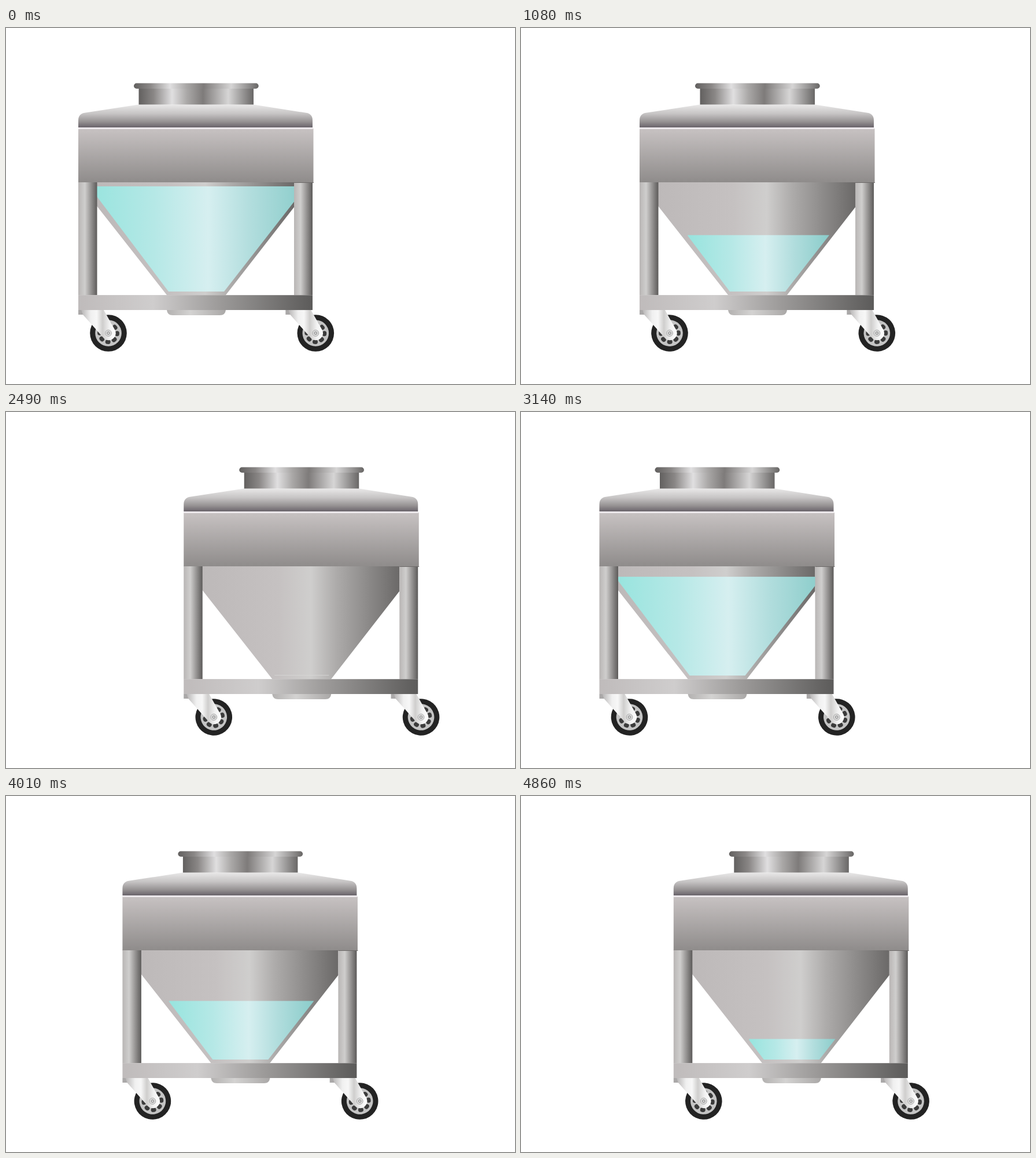
An HTML page for the animation above (4.91 s loop, 880 by 616 pixels).

```html
<!DOCTYPE html>
<html lang="en">
<head>
<meta charset="utf-8">
<title>Rolling hopper</title>
<style>
  /* --x: distance rolled in px; level and wheel angle follow from it */
  @property --x { syntax: '<number>'; inherits: true; initial-value: 0; }

  html, body { margin: 0; width: 100%; height: 100%; overflow: hidden; background: #fff; }
  svg { display: block; width: 880px; height: 616px; animation: roll 4910ms infinite; }

  .bin { transform: translateX(calc(var(--x) * 1px)); }
  .liquid {
    transform-box: view-box;
    transform-origin: 330.5px 0;
    transform: translateY(calc(var(--x) * 1.055px)) scaleX(calc(1 - var(--x) * .00432));
  }
  .wheel { transform: rotate(calc(var(--x) * 1.64deg)); }

  @keyframes roll {
    0%      { --x: 0;     animation-timing-function: steps(1); }
    .6%     { --x: 3.5;   animation-timing-function: steps(10); }
    10.58%  { --x: 38.5;  animation-timing-function: steps(12); }
    21.97%  { --x: 80;    animation-timing-function: steps(13); }
    34.6%   { --x: 125;   animation-timing-function: steps(12); }
    45.58%  { --x: 166;   animation-timing-function: steps(8); }
    53.259% { --x: 192;   animation-timing-function: steps(1); }
    53.26%  { --x: -28.2; animation-timing-function: steps(16); }
    68.6%   { --x: 28.1;  animation-timing-function: steps(14); }
    81.63%  { --x: 76.4;  animation-timing-function: steps(18); }
    98.94%, 100% { --x: 138.8; animation-timing-function: steps(1); }
  }
</style>
</head>
<body>
<svg viewBox="0 0 880 616" xmlns="http://www.w3.org/2000/svg">
  <defs>
    <linearGradient id="neck">
      <stop offset="0" stop-color="#62605f"/>
      <stop offset=".13" stop-color="#8a8786"/>
      <stop offset=".29" stop-color="#e0dfe0"/>
      <stop offset=".42" stop-color="#aaa8a7"/>
      <stop offset=".56" stop-color="#7e7b7a"/>
      <stop offset=".78" stop-color="#d6d5d5"/>
      <stop offset="1" stop-color="#696766"/>
    </linearGradient>
    <linearGradient id="dome" x2="0" y2="1">
      <stop offset="0" stop-color="#e9e8e8"/>
      <stop offset=".4" stop-color="#c6c4c4"/>
      <stop offset=".75" stop-color="#969293"/>
      <stop offset="1" stop-color="#69636a"/>
    </linearGradient>
    <linearGradient id="body" x2="0" y2="1">
      <stop offset="0" stop-color="#c7c2c2"/>
      <stop offset="1" stop-color="#8f8c8b"/>
    </linearGradient>
    <linearGradient id="funnel">
      <stop offset="0" stop-color="#bdb9b9"/>
      <stop offset=".38" stop-color="#c5c1c1"/>
      <stop offset=".55" stop-color="#cfcecd"/>
      <stop offset=".68" stop-color="#adabaa"/>
      <stop offset="1" stop-color="#6b6968"/>
    </linearGradient>
    <linearGradient id="water">
      <stop offset="0" stop-color="#97e4de"/>
      <stop offset=".3" stop-color="#b5e8e6"/>
      <stop offset=".55" stop-color="#d6eff0"/>
      <stop offset=".75" stop-color="#b1dddd"/>
      <stop offset="1" stop-color="#8accca"/>
    </linearGradient>
    <linearGradient id="leg">
      <stop offset="0" stop-color="#b9b6b5"/>
      <stop offset=".35" stop-color="#cfcecd"/>
      <stop offset=".6" stop-color="#a3a1a0"/>
      <stop offset="1" stop-color="#5d5b5a"/>
    </linearGradient>
    <linearGradient id="bar">
      <stop offset="0" stop-color="#bfbbbb"/>
      <stop offset=".32" stop-color="#cfcdcd"/>
      <stop offset=".6" stop-color="#9d9b9a"/>
      <stop offset="1" stop-color="#5c5b5a"/>
    </linearGradient>
    <linearGradient id="outlet">
      <stop offset="0" stop-color="#b3b1b0"/>
      <stop offset=".4" stop-color="#d3d2d1"/>
      <stop offset="1" stop-color="#aaa8a7"/>
    </linearGradient>
    <linearGradient id="fork">
      <stop offset="0" stop-color="#b6b4b4"/>
      <stop offset=".28" stop-color="#f0f0f0"/>
      <stop offset=".45" stop-color="#f7f7f7"/>
      <stop offset=".62" stop-color="#cfcecd"/>
      <stop offset=".82" stop-color="#f2f2f2"/>
      <stop offset="1" stop-color="#fff"/>
    </linearGradient>
    <clipPath id="inside"><path d="M131 257H532L377 456H281Z"/></clipPath>

    <g id="caster">
      <path d="M125 488h10v8h-10z" fill="#aaa8a8"/>
      <g transform="translate(177 528)">
        <g class="wheel">
          <circle r="31.8" fill="#232323"/>
          <circle r="22.8" fill="#c4c4c4"/>
          <circle r="15.2" fill="none" stroke="#3b3b3b" stroke-width="7.4"
            stroke-linecap="round" pathLength="8" stroke-dasharray=".14 .86"/>
          <circle r="10.5" fill="#d6d6d6"/>
        </g>
      </g>
      <path d="M130 488H169L187.5 521A12 12 0 0 1 167.5 535L133 496Z" fill="url(#fork)"/>
      <g transform="translate(177 528)">
        <circle r="5.4" fill="#dcdcdc" stroke="#aaa"/>
        <circle r="2.4" fill="#b8b8b8" stroke="#888" stroke-width=".8"/>
        <circle r=".9" fill="#eee"/>
      </g>
    </g>
  </defs>

  <g class="bin">
    <path d="M157 266H498V310L380 462H278L157 308Z" fill="url(#funnel)"/>
    <path d="M282 455.5H376" stroke="#d9d8d7" stroke-width=".8"/>
    <g clip-path="url(#inside)">
      <rect class="liquid" x="143.5" y="274" width="374" height="240" fill="url(#water)"/>
    </g>

    <rect x="125" y="266" width="32.5" height="196" fill="url(#leg)"/>
    <rect x="498" y="267" width="32" height="195" fill="url(#leg)"/>

    <path d="M278 488H380Q379 497 370 497H288Q279 497 278 488Z" fill="url(#outlet)"/>
    <use href="#caster"/>
    <use href="#caster" x="358.3"/>
    <rect x="125" y="462" width="405" height="26" fill="url(#bar)"/>
    <path d="M125 462.3H530" stroke="#dad8d8" stroke-width=".6" opacity=".6"/>

    <path d="M125 172V160Q125 148.500 136 146.800L229 132.500H428L519 146.800Q530 148.500 530 160V172Z" fill="url(#dome)"/>
    <rect x="229.500" y="104" width="198.500" height="28.500" fill="url(#neck)"/>
    <rect x="221" y="95.500" width="215.700" height="9.500" rx="4.700" fill="url(#neck)"/>
    <rect x="125" y="174" width="406.500" height="93" fill="url(#body)"/>
    <rect x="125" y="172" width="405.500" height="3" fill="#ece8eb"/>
    <path d="M498 267.500H532" stroke="#6c6968"/>
  </g>
</svg>
</body>
</html>
```
